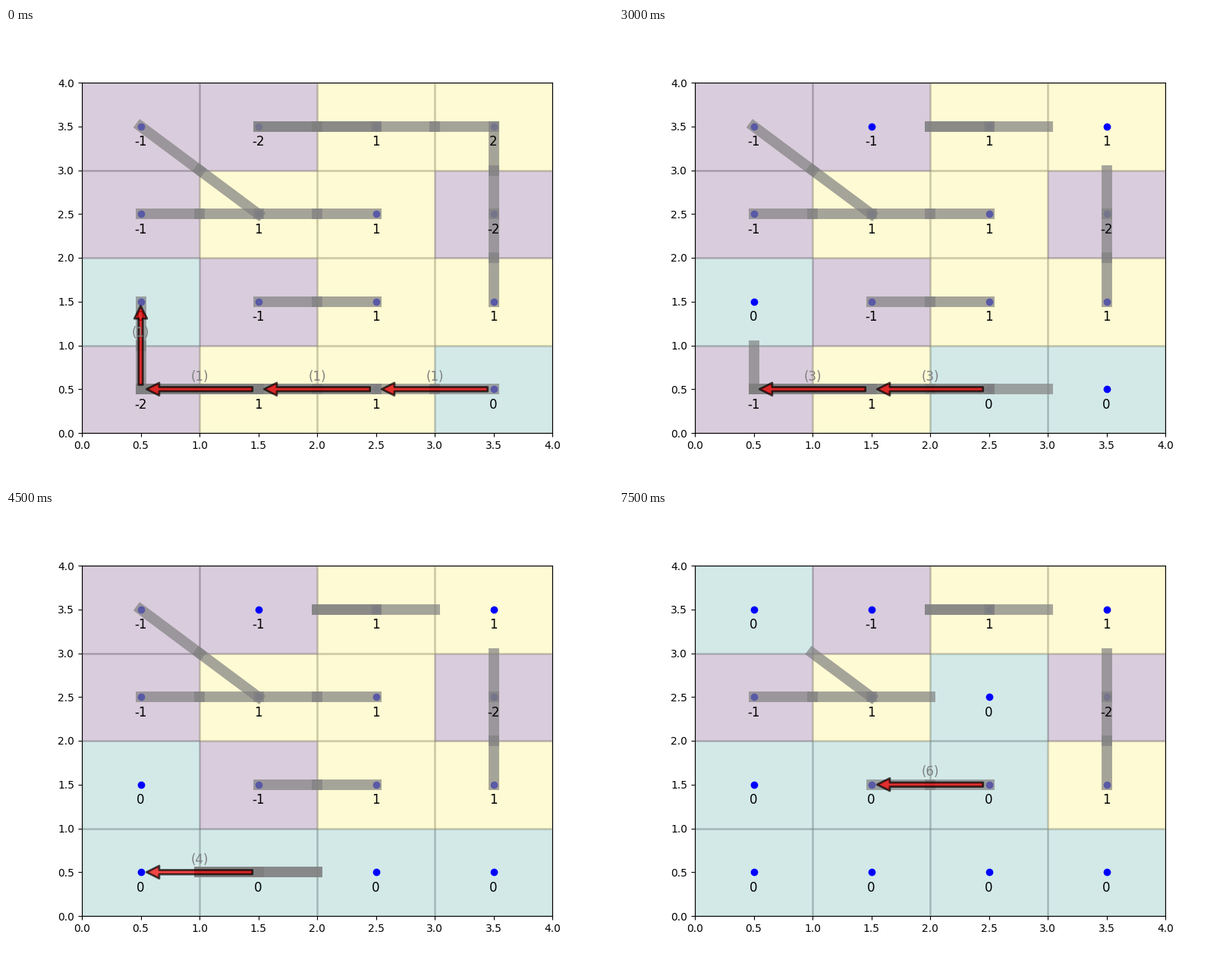
Recreate the animation shown at these times as a matplotlib script. Size 800 by 600 pixels, loop 8000 ms.

```python
import numpy as np
import matplotlib.pyplot as plt
from matplotlib.animation import FuncAnimation

SIZE = 4
STEP_MS, TICK_MS, LOOP_MS = 1500, 500, 8000

# Each trip carries one unit along straight runs between (column, row) corners.
# Balances, cell colours and link weights all follow from these trips.
TRIPS = [
    [(3, 0), (0, 0), (0, 1)],
    [(3, 3), (1, 3)],
    [(2, 0), (0, 0)],
    [(1, 0), (0, 0)],
    [(2, 2), (1, 2), (0, 3)],
    [(2, 1), (1, 1)],
    [(2, 3), (1, 3)],
    [(3, 3), (3, 2)],
    [(3, 1), (3, 2)],
    [(1, 2), (0, 2)],
]

ARROW = dict(facecolor="red", edgecolor="black", linewidth=2,
             shrink=0.05, alpha=0.7)

fig = plt.figure(figsize=(8, 6), dpi=100)
ax = fig.add_subplot()


def hops(trip):
    """Pairs of neighbouring cell centres along a trip."""
    for a, b in zip(trip, trip[1:]):
        a, b = np.array(a) + 0.5, np.array(b) + 0.5
        count = int(np.abs(b - a).max())
        unit = (b - a) / count
        for i in range(count):
            yield a + i * unit, a + (i + 1) * unit


def balances(step):
    """Units still to leave (+) or reach (-) each cell after this step."""
    grid = np.zeros((SIZE, SIZE), int)
    for trip in TRIPS[step + 1:]:
        (c0, r0), (c1, r1) = trip[0], trip[-1]
        grid[r0, c0] += 1
        grid[r1, c1] -= 1
    return grid


def draw_cells(grid):
    ax.pcolormesh(np.sign(grid), cmap="viridis", vmin=-1, vmax=1,
                  alpha=0.2, edgecolors="gray", linewidth=2)
    for row, col in np.ndindex(grid.shape):
        x, y = col + 0.5, row + 0.5
        ax.plot(x, y, "bo")
        ax.text(x, y - 0.1, str(grid[row, col]), fontsize=12,
                ha="center", va="top")


def draw_links(step):
    # A cell owns the half link on its side; ends of past trips drop theirs.
    done = {end for trip in TRIPS[:step] for end in (trip[0], trip[-1])}
    for trip in TRIPS:
        for a, b in hops(trip):
            mid = (a + b) / 2
            for node in (a, b):
                if tuple(node.astype(int)) not in done:
                    ax.plot(*zip(node, mid), color="gray", linewidth=10,
                            alpha=0.7)


def draw_trip(step):
    for a, b in hops(TRIPS[step]):
        ax.annotate("", xy=b, xytext=a, arrowprops=ARROW)
        x, y = (a + b) / 2
        ax.text(x, y + 0.1, f"({step + 1})", fontsize=12, color="gray",
                ha="center")


def draw(tick):
    step = tick * TICK_MS // STEP_MS
    ax.clear()
    draw_cells(balances(step))
    draw_links(step)
    draw_trip(step)
    ax.set_xlim(0, SIZE)
    ax.set_ylim(0, SIZE)
    return []


anim = FuncAnimation(fig, draw, frames=LOOP_MS // TICK_MS, interval=TICK_MS,
                     init_func=lambda: draw(0), repeat=True, repeat_delay=0)
plt.show()
```
